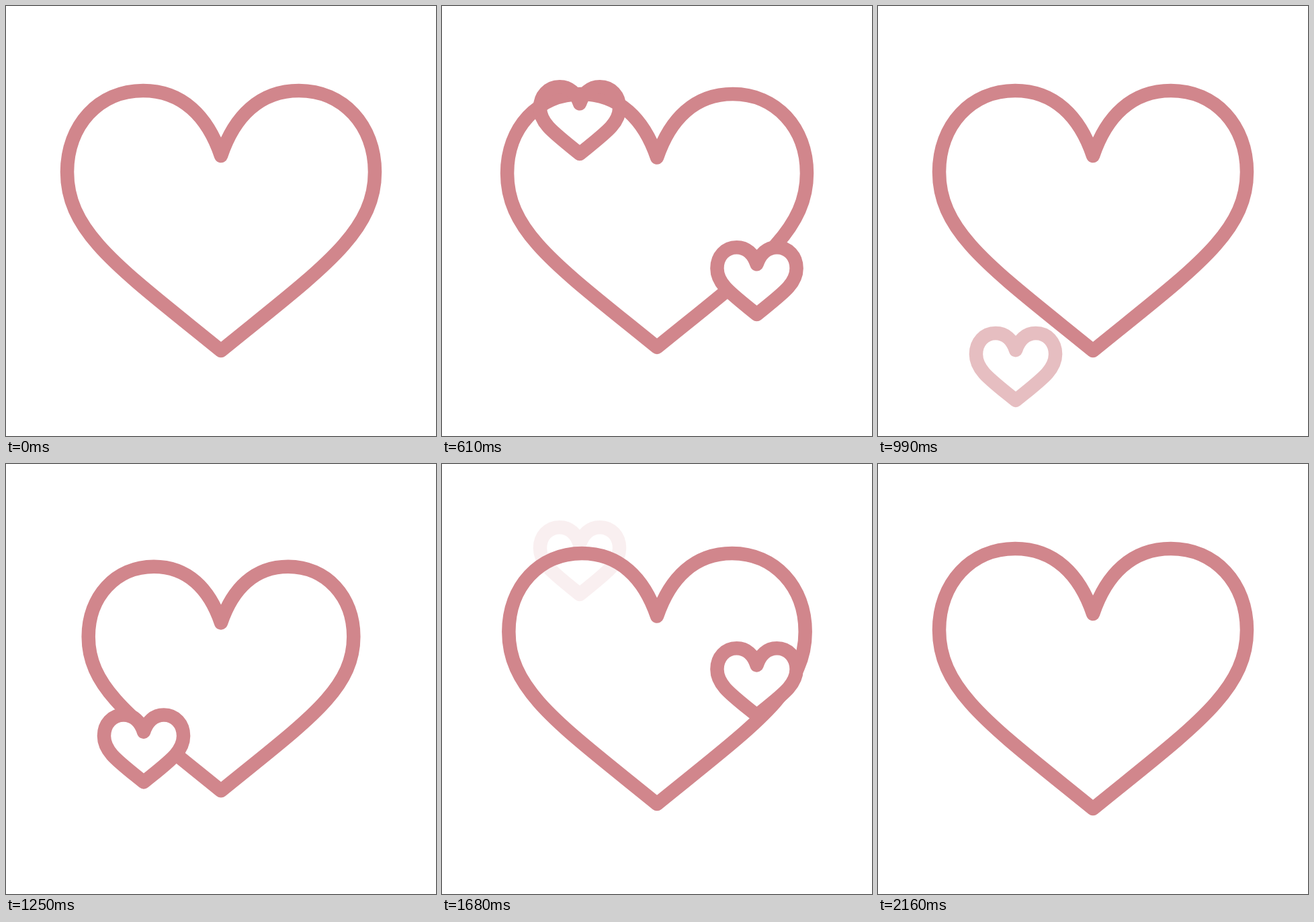
Write an HTML page with a canvas that moves like this. It is 640 px wide and 640 px high and loops after 2250 ms.

```html
<!DOCTYPE html>
<html lang="en">
<head>
<meta charset="utf-8">
<title>Beating heart</title>
<style>
  html, body { margin: 0; width: 100%; height: 100%; overflow: hidden; background: #fff; }
  canvas { display: block; width: 100vmin; height: 100vmin; }
</style>
</head>
<body>
<canvas id="stage" width="640" height="640"></canvas>
<script>
const ctx = document.getElementById('stage').getContext('2d');
const LOOP = 2250, STEP = 43.2, PINK = '#d1868c', LINE = 20.5;

// Heart outline around its own centre, symmetric left and right
const heart = new Path2D(
  'M0-96.5C-20-155.5-58-193.5-116-193.5C-182-193.5-229-141.5-229-72.5C-229 18.5-150 71.5 0 193.5' +
  'C150 71.5 229 18.5 229-72.5C229-141.5 182-193.5 116-193.5C58-193.5 20-155.5 0-96.5Z');

// Keys of the big heart: time, scale
const beats = [
  [110, 1], [373, .735], [661, 1],
  [1119, 1], [1379, .735], [1639, 1],
  [1836, .735], [2150, 1]
];

// Small hearts: centre x, start of the rise, its length, start of the fade-in
const risers = [
  { x: 205, start: 74, span: 630, show: 105 },
  { x: 468.5, start: 376, span: 600, show: 331 },
  { x: 205, start: 1012, span: 678, show: 967 },
  { x: 468.5, start: 1325, span: 682, show: 1280 }
];

const clamp = v => Math.min(1, Math.max(0, v));
const ease = v => v * v * (3 - 2 * v);

function beatScale(t) {
  const i = beats.findIndex(key => key[0] > t);
  if (i < 1) return 1;
  const [t0, a] = beats[i - 1], [t1, b] = beats[i];
  return a + (b - a) * ease((t - t0) / (t1 - t0));
}

function drawHeart(x, y, scale, filled) {
  ctx.save();
  ctx.translate(x, y);
  ctx.scale(scale, scale);
  ctx.lineWidth = LINE / scale;
  if (filled) ctx.fill(heart);
  ctx.stroke(heart);
  ctx.restore();
}

function drawRiser({ x, start, span, show }, t) {
  const u = (t - start) / span;
  ctx.globalAlpha = Math.min(clamp((t - show) / 50), clamp((1 - u) / .06));
  // The white inside covers the big heart only on the way up
  if (ctx.globalAlpha > 0) drawHeart(x, 537 - 393 * ease(clamp(u)), .258, u < .7);
  ctx.globalAlpha = 1;
}

function draw(t) {
  ctx.fillStyle = '#fff';
  ctx.fillRect(0, 0, 640, 640);
  ctx.strokeStyle = PINK;
  ctx.lineJoin = 'round';
  drawHeart(320, 319.5, beatScale(t), false);
  risers.forEach(r => drawRiser(r, t));
}

const begin = performance.now();
function tick() {
  const t = (performance.now() - begin) % LOOP;
  // Stepped time, about 23 pictures a second
  draw(Math.floor((t + 12) / STEP) * STEP);
  requestAnimationFrame(tick);
}
tick();
</script>
</body>
</html>
```
